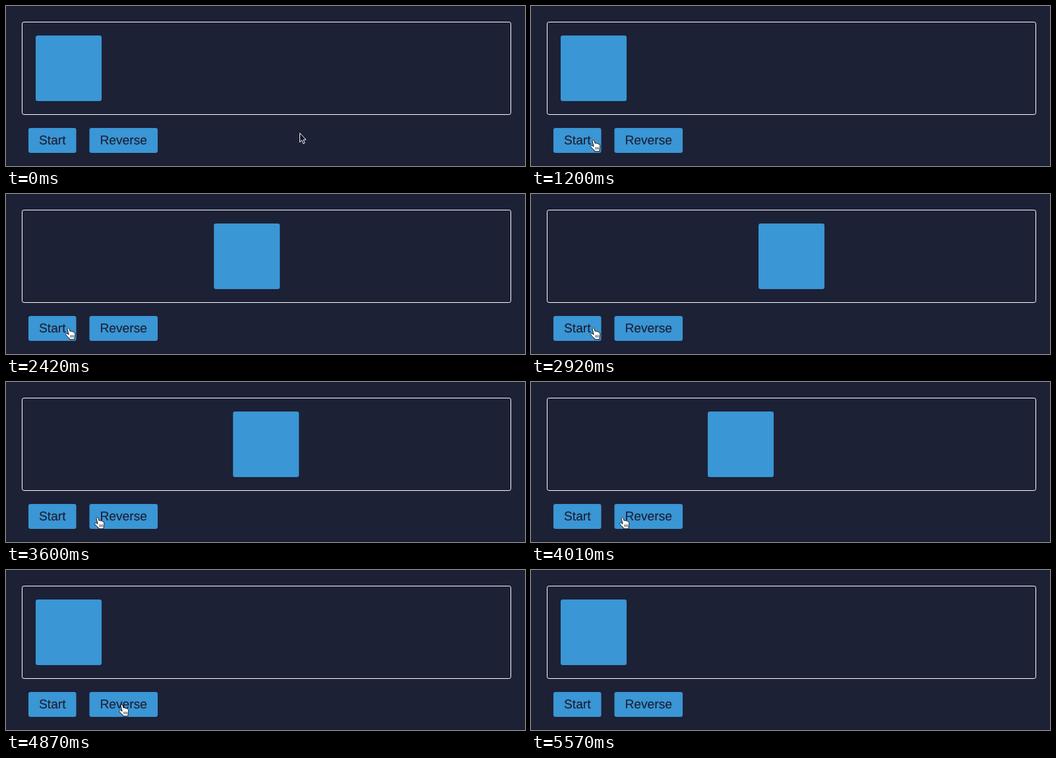
An HTML page that plays this animation: 787x244 px, repeating every 6.2 s.

```html
<!DOCTYPE html>
<html lang="en">
<head>
<meta charset="utf-8">
<title>Start and reverse</title>
<style>
  html, body { margin: 0; width: 100%; height: 100%; overflow: hidden; background: #1c2136; }
  svg { display: block; }
  text {
    font: 19.2px "Liberation Sans", Arial, sans-serif;
    text-rendering: geometricPrecision;
    fill: #1c2136; stroke: #1c2136; stroke-width: .2;
  }
  .blue { fill: #3a96d5; }
</style>
</head>
<body>
<svg width="787" height="244" viewBox="0 0 787 244">
  <rect x="24.5" y="24.5" width="741" height="141" rx="2.7" fill="none" stroke="#fff"/>
  <rect id="box" class="blue" x="45" y="45" width="100" height="100" rx="3.2"/>
  <rect class="blue" x="34" y="186" width="72.5" height="38" rx="3.2"/>
  <rect class="blue" x="126.5" y="186" width="103.5" height="38" rx="3.2"/>
  <text x="50" y="211">Start</text>
  <text x="142.5" y="211">Reverse</text>
  <g id="cursor">
    <path id="arrow" d="M.5 .8V14.6L3.6 11.7L5.7 16.8L8 15.8L5.9 10.9H10Z"
      fill="#10131f" stroke="#fff" stroke-linejoin="round"/>
    <g id="hand" stroke="#10131f" stroke-linejoin="round" stroke-linecap="round">
      <path fill="#fff" d="M-1.9 .5C-2.6-1.6 .2-2.3 .9-.3L2.2 3.6C2.9 2.7 4.6 2.9 5 4.2C5.9 3.3 7.4 3.7 7.8 5.1C8.7 4.6 9.6 5.2 9.7 6.7C9.8 9.3 9.3 10.6 9.1 12.4V15.8H1.5L1.2 14.2C-1 12.8-2.9 10.6-4.3 8.6C-5 7-3.2 6-2 7L-.2 8.2Z"/>
      <path fill="none" stroke-width=".8" d="M3 9.5V12.5M5.1 9.5V12.5M7.2 9.5V12.5"/>
    </g>
  </g>
</svg>
<script>
const LOOP = 6200, LEFT = 45, TRAVEL = 300, EXIT = 5570;
const [box, cursor, arrow, hand] =
  ["box", "cursor", "arrow", "hand"].map(id => document.getElementById(id));

const progress = (t, start, end) => Math.min(1, Math.max(0, (t - start) / (end - start)));
const easeInOut = k => k < .5 ? 2 * k * k : 1 - 2 * (1 - k) ** 2;

// Pointer moves along quadratic curves.
const moves = [
  { start: 540, end: 1200, from: [445, 193], via: [270, 199], to: [95, 206] },
  { start: 2920, end: 3240, from: [95, 206], via: [116, 203], to: [139, 208] },
  { start: 4760, end: EXIT, from: [139, 208], via: [640, 193], to: [732, 245] }
];

// Quadratic ease-out to the right, then the same tween played backwards.
function boxX(t) {
  const u = 1 - progress(t, 1762, 2724) + progress(t, 3555, 4455);
  return LEFT + TRAVEL * (1 - u * u);
}

function pointer(t) {
  const { start, end, from, via, to } = moves.filter(m => t >= m.start).pop() || moves[0];
  const k = easeInOut(progress(t, start, end));
  return from.map((a, i) => a * (1 - k) ** 2 + 2 * via[i] * k * (1 - k) + to[i] * k * k);
}

function onButton(x, y) {
  return y >= 186 && y < 224 && ((x >= 34 && x < 106.5) || (x >= 126.5 && x < 230));
}

function show(part, on) {
  part.style.display = on ? "" : "none";
}

function draw() {
  const t = performance.now() % LOOP;
  const [x, y] = pointer(t), over = onButton(x, y);
  box.setAttribute("x", boxX(t).toFixed(2));
  cursor.setAttribute("transform", `translate(${Math.round(x)} ${Math.round(y)})`);
  show(cursor, t < EXIT);
  show(arrow, !over);
  show(hand, over);
  requestAnimationFrame(draw);
}
draw();
</script>
</body>
</html>
```
